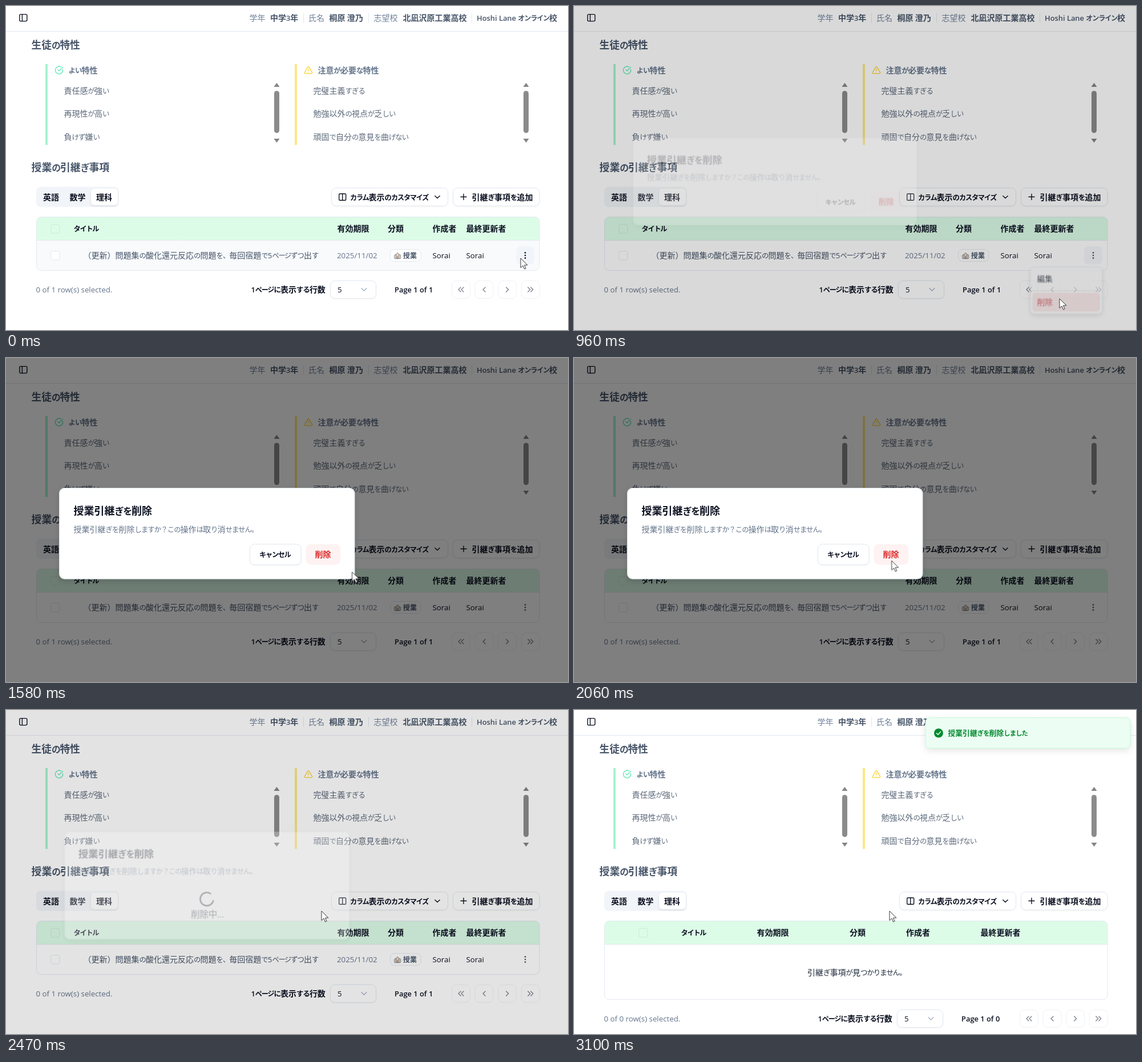
An HTML page for the animation above (3430 ms loop, 985 by 569 pixels).

```html
<!DOCTYPE html>
<html lang="ja">
<head>
<meta charset="utf-8">
<title>授業の引継ぎ事項</title>
<style>
html, body { margin: 0; width: 100%; height: 100%; overflow: hidden; background: #fff; }
svg { display: block; font-family: "Open Sans", "Noto Sans CJK JP", "Noto Sans", sans-serif; }
.b { font-weight: 600; }
.hira { font-size: .89em; letter-spacing: -.08em; }
.kata { font-size: .87em; letter-spacing: -.1em; }
.latin { font-size: .95em; }
.b .latin { font-size: .92em; }
.soft { filter: drop-shadow(0 1px 1px #0000000d); }
.deep { filter: drop-shadow(0 4px 5px #00000022); }
#menu { transform-origin: 926px 458px; }
#dialog { transform-origin: 352.3px 308.4px; }
#spin { transform-origin: 352px 333px; }
</style>
</head>
<body>
<svg id="stage" width="985" height="569" viewBox="0 0 985 569" fill="none"></svg>
<script>
const LOOP = 3430;
const INK = '#0b1020', SLATE = '#475569', MUTED = '#64748b', LINE = '#e2e8f0';

// Kana are set tighter than kanji, Latin a little smaller.
const runs = s => s.replace(/([ぁ-ん、。？]+)|([ァ-ヶー]+)|[ -~]+/g, (m, hira, kata) =>
  `<tspan class="${hira ? 'hira' : kata ? 'kata' : 'latin'}">${m}</tspan>`);
const text = (x, y, s, fill = INK, cls = '', size = 14) =>
  `<text x="${x}" y="${y}" fill="${fill}" class="${cls}" font-size="${size}">${runs(s)}</text>`;
const bold = (x, y, s, fill = INK, size = 14) => text(x, y, s, fill, 'b', size);
const box = (x, y, w, h, r, fill = '#fff', stroke = LINE, extra = '') =>
  `<rect x="${x}" y="${y}" width="${w}" height="${h}" rx="${r}" fill="${fill}" stroke="${stroke}" ${extra}/>`;
const line = (d, stroke = LINE, width = 1) =>
  `<path d="${d}" stroke="${stroke}" stroke-width="${width}" stroke-linecap="round" stroke-linejoin="round"/>`;
const icon = (x, y, size, d, stroke, width = 2) =>
  `<g transform="translate(${x} ${y}) scale(${size / 24})">${line(d, stroke, width)}</g>`;
const group = (id, ...parts) => `<g id="${id}">${parts.join('')}</g>`;

function header() {
  return [
    box(23.8, 14.6, 13, 12, 2, 'none', INK, 'stroke-width="1.4"'),
    line('M28.4 14.6v12', INK, 1.4),
    text(426.5, 26, '学年', '#71829b'), bold(463, 26, '中学3年', SLATE),
    text(530, 26, '氏名', '#71829b'), bold(566.5, 26, '桐原 澄乃', SLATE),
    text(644.5, 26, '志望校', '#71829b'), bold(695.5, 26, '北凪沢原工業高校', SLATE),
    bold(825, 26, 'Hoshi Lane オンライン校', SLATE),
    line('M521.5 13v16M635.5 13v16M816.5 13v16M0 44.5H985')
  ].join('');
}

function traits(x, bar, mark, title, items) {
  const sx = x + 405.5;
  return `<rect x="${x}" y="102" width="4" height="142" fill="${bar}"/>` +
    icon(x + 16, 104.7, 16, ...mark) +
    bold(x + 40.5, 118, title, MUTED) +
    items.map((s, i) => text(x + 32.5, 154 + 40.4 * i, s, '#5b687a')).join('') +
    `<path d="M${sx} 135l5 7h-10zM${sx} 240l5-7h-10z" fill="#858585"/>` +
    `<rect x="${sx - 4.5}" y="149" width="9" height="74" rx="4.5" fill="#8b8b8b"/>`;
}

function toolbar() {
  return [
    box(53, 317.5, 144.5, 35.5, 8, '#f1f5f9', 'none'),
    box(149, 320.5, 47, 29.5, 6, '#fff', 'none', 'style="filter:drop-shadow(0 1px 1.5px #0002)"'),
    bold(65, 340.5, '英語'), bold(111.5, 340.5, '数学'), bold(158, 340.5, '理科'),
    box(570.5, 319.5, 204, 31.5, 8, '#fff', LINE, 'class="soft"'),
    box(583.7, 329.7, 12, 11.5, 1.5, 'none', INK, 'stroke-width="1.4"'),
    line('M589.7 329.7v11.5M751.8 333.4l4.2 4.2 4.2-4.2', INK, 1.4),
    bold(603, 340.5, 'カラム表示のカスタマイズ'),
    box(783.5, 319.5, 151.5, 31.5, 8, '#fff', LINE, 'class="soft"'),
    line('M797 335.3h10M802 330.3v10', INK, 1.4),
    bold(816.5, 340.5, '引継ぎ事項を追加')
  ].join('');
}

const tableHead = (boxX, xs) =>
  '<path d="M54 411v-32.5a8 8 0 0 1 8-8H927a8 8 0 0 1 8 8V411z" fill="#dcfce7"/>' +
  box(boxX, 383.5, 15.5, 15.5, 4, 'none', '#cfe8dc') +
  ['タイトル', '有効期限', '分類', '作成者', '最終更新者'].map((s, i) => bold(xs[i], 396, s)).join('');

const tableFrame = h => box(53.5, 370.5, 881.5, h, 8, 'none') + line('M54 411.5H934.5');

function pager(y, shift, count) {
  const chevrons = ['M-.5-4l-4 4 4 4M4.5-4l-4 4 4 4', 'M2-4l-4 4 4 4', 'M-2-4l4 4-4 4', 'M-4.5-4l4 4-4 4M.5-4l4 4-4 4'];
  return [
    text(52.5, y + 5, `0 of ${count} row(s) selected.`, MUTED),
    bold(429.5 - shift, y + 5, '1ページに表示する行数'),
    box(568.5 - shift, y - 15.5, 80, 31, 8, '#fff', LINE, 'class="soft"'),
    text(581 - shift, y + 5, '5'),
    line(`M${623 - shift} ${y - 2.3}l4.5 4.5 4.5-4.5`, '#94a3b8', 1.2),
    bold(681 - shift, y + 5, `Page 1 of ${count}`),
    ...chevrons.map((d, i) => box(781.5 + 40.6 * i, y - 15.5, 32, 31, 8, '#fff', '#eef1f6') +
      `<g transform="translate(${797.5 + 40.6 * i} ${y})">${line(d, '#80848e', 1.4)}</g>`)
  ].join('');
}

const filled = () => group('filled',
  tableHead(78.5, [118.5, 580.5, 669, 747.5, 806.5]),
  '<path id="hover" d="M54 412H934.5V456a8 8 0 0 1-8 8H62a8 8 0 0 1-8-8z" fill="#f8fafc"/>',
  box(894, 422, 32, 31.5, 7, '#eff3f8', 'none', 'id="more"'),
  tableFrame(94),
  box(78.5, 430.5, 15.5, 15.5, 4),
  text(135.5, 443, '（更新）問題集の酸化還元反応の問題を、毎回宿題で5ページずつ出す', SLATE),
  text(580, 443, '2025/11/02', MUTED),
  box(673.5, 427.5, 53.5, 21, 7, '#fff', LINE),
  box(680.7, 437, 11, 6.7, 1, '#efe6dc', '#7c7f88'),
  '<path d="M683.5 443.5v-7.5l2.7-2.7 2.7 2.7v7.5z" fill="#e8d3bd" stroke="#7c7f88"/>',
  line('M686.2 443v-3', '#8a6a4c', 1.4),
  bold(696, 442.5, '授業', SLATE, 12),
  text(747.5, 443, 'Sorai'), text(806.5, 443, 'Sorai'),
  group('dots', ...[433.3, 438, 442.7].map(y => `<circle cx="910" cy="${y}" r="1.35"/>`)),
  pager(498, 0, 1));

const empty = () => group('empty',
  tableHead(113.5, [187.5, 320.5, 483, 582, 712.5]),
  tableFrame(138),
  text(409, 466, '引継ぎ事項が見つかりません。', '#1e293b'),
  pager(542, 2, 0));

const menu = () => group('menu',
  box(797.5, 458.5, 128.5, 83.5, 7, '#fff', LINE, 'class="deep"'),
  line('M798 500.5H925.5'),
  text(809.5, 485, '編集', '#0f172a'),
  box(801.5, 504.5, 120, 33, 5, '#fde4e6', 'none', 'id="danger"'),
  text(809.5, 526, '削除', '#c0262f'));

const dialogHead = (y, h) =>
  box(93.5, y, 517.5, h, 9, '#fff', LINE, 'class="deep"') +
  bold(118.5, y + 46.5, '授業引継ぎを削除', INK, 18) +
  text(118.5, y + 77, '授業引継ぎを削除しますか？この操作は取り消せません。', MUTED);

const dialog = () => group('dialog',
  group('confirm', dialogHead(228.5, 159.5),
    box(427.5, 327, 89.5, 36, 8, '#fff', LINE, 'class="soft"'), bold(444, 350, 'キャンセル'),
    box(525.5, 327, 60.5, 36, 8, '#fef2f2', 'none'), bold(541.5, 350, '削除', '#dc2626')),
  group('busy', dialogHead(210.5, 195.5),
    group('spin', icon(336, 317, 32, 'M21 12a9 9 0 1 1-6.219-8.56', '#0f172a')),
    text(323, 367, '削除中...', '#0f172a', '', 16)));

const toast = () => group('toast',
  box(616, 13.5, 359, 53.5, 8, '#ecfdf3', '#bffcd9', 'style="filter:drop-shadow(0 4px 6px #0000001a)"'),
  '<circle cx="639" cy="40.5" r="8" fill="#008a2e"/>',
  line('M635.5 40.8l2.5 2.5 4.5-5', '#ecfdf3', 1.6),
  bold(655.5, 45, '授業引継ぎを削除しました', '#008a2e', 12.8));

const check = 'M21.8 10A10 10 0 1 1 17 3.335M9 11l3 3L22 4';
const alertMark = 'M21.73 18l-8-14a2 2 0 0 0-3.48 0l-8 14A2 2 0 0 0 4 21h16a2 2 0 0 0 1.73-3M12 9v4M12 17h.01';

document.getElementById('stage').innerHTML = [
  header(),
  bold(44.5, 75.3, '生徒の特性', SLATE, 17.7),
  traits(69, '#a4f4cf', [check, '#5ee9b5'], 'よい特性',
    ['責任感が強い', '再現性が高い', '負けず嫌い']),
  traits(506, '#fee685', [alertMark, '#ffd230'], '注意が必要な特性',
    ['完璧主義すぎる', '勉強以外の視点が乏しい', '頑固で自分の意見を曲げない']),
  bold(44.5, 290, '授業の引継ぎ事項', SLATE, 17.9),
  toolbar(), filled(), empty(), menu(),
  '<rect id="shade" width="985" height="569" fill="#000"/>',
  dialog(), toast(),
  group('cursor',
    '<circle id="click" r="12" fill="#fbea2c" fill-opacity=".8"/>',
    '<path d="M0 0V16.5L4 13l2.6 6 2.5-1.1-2.6-5.9H12z" fill="#fff" stroke="#222" stroke-width=".9" stroke-linejoin="round"/>')
].join('');

// steps: [ms, keyframe, easing to the next step]
function loop(id, steps) {
  const all = [[0, steps[0][1]], ...steps, [LOOP, steps[steps.length - 1][1]]];
  document.getElementById(id).animate(
    all.map(([ms, frame, easing = 'linear']) => ({ offset: ms / LOOP, easing, ...frame })),
    { duration: LOOP, iterations: Infinity });
}
const alpha = opacity => ({ opacity });
const tint = fill => ({ fill });
const pose = (opacity, scale) => ({ opacity, transform: `scale(${scale})` });
const move = (x, y) => ({ transform: `translate(${x}px, ${y}px)` });
const turn = deg => ({ transform: `rotate(${deg}deg)` });
const visible = (id, ...spans) => loop(id, spans.flatMap(([on, off]) =>
  [[on, alpha(0)], [on, alpha(1)], [off, alpha(1)], [off, alpha(0)]]));

loop('filled', [[2820, alpha(1)], [2820, alpha(0)]]);
loop('empty', [[2820, alpha(0)], [2820, alpha(1)]]);
loop('hover', [[210, alpha(1)], [360, alpha(0)]]);
loop('dots', [[210, tint(INK)], [360, tint(SLATE)]]);
loop('more', [[0, alpha(.7)], [140, alpha(1)], [930, alpha(1)], [1030, alpha(0)]]);
loop('menu', [[200, pose(0, .95)], [330, pose(1, 1)], [930, pose(1, 1), 'ease'], [1075, pose(0, .95)]]);
visible('danger', [630, 1100]);
loop('shade', [[930, alpha(0), 'ease'], [1085, alpha(.5)], [2375, alpha(.5), 'ease'], [2575, alpha(0)]]);
loop('dialog', [[930, pose(0, .95), 'ease'], [1130, pose(1, 1)], [2385, pose(1, 1), 'ease'], [2585, pose(0, .95)]]);
loop('confirm', [[2350, alpha(1)], [2350, alpha(0)]]);
loop('busy', [[2350, alpha(0)], [2350, alpha(1)]]);
loop('spin', [[2350, turn(-28)], [2650, turn(80)]]);
loop('toast', [
  [2650, { ...alpha(0), ...move(0, -54) }, 'ease'],
  [3050, { ...alpha(1), ...move(0, 0) }]
]);
visible('click', [70, 200], [830, 960]);
loop('cursor', [
  [210, move(902, 443)], [350, move(893, 451)], [560, move(856, 473)], [630, move(851, 514)],
  [1060, move(851, 514), 'ease-in'], [1300, move(769, 476)], [1580, move(607, 376)],
  [1720, move(542, 338), 'ease-out'], [1860, move(562, 360)], [2200, move(553, 353)]
]);
</script>
</body>
</html>
```
